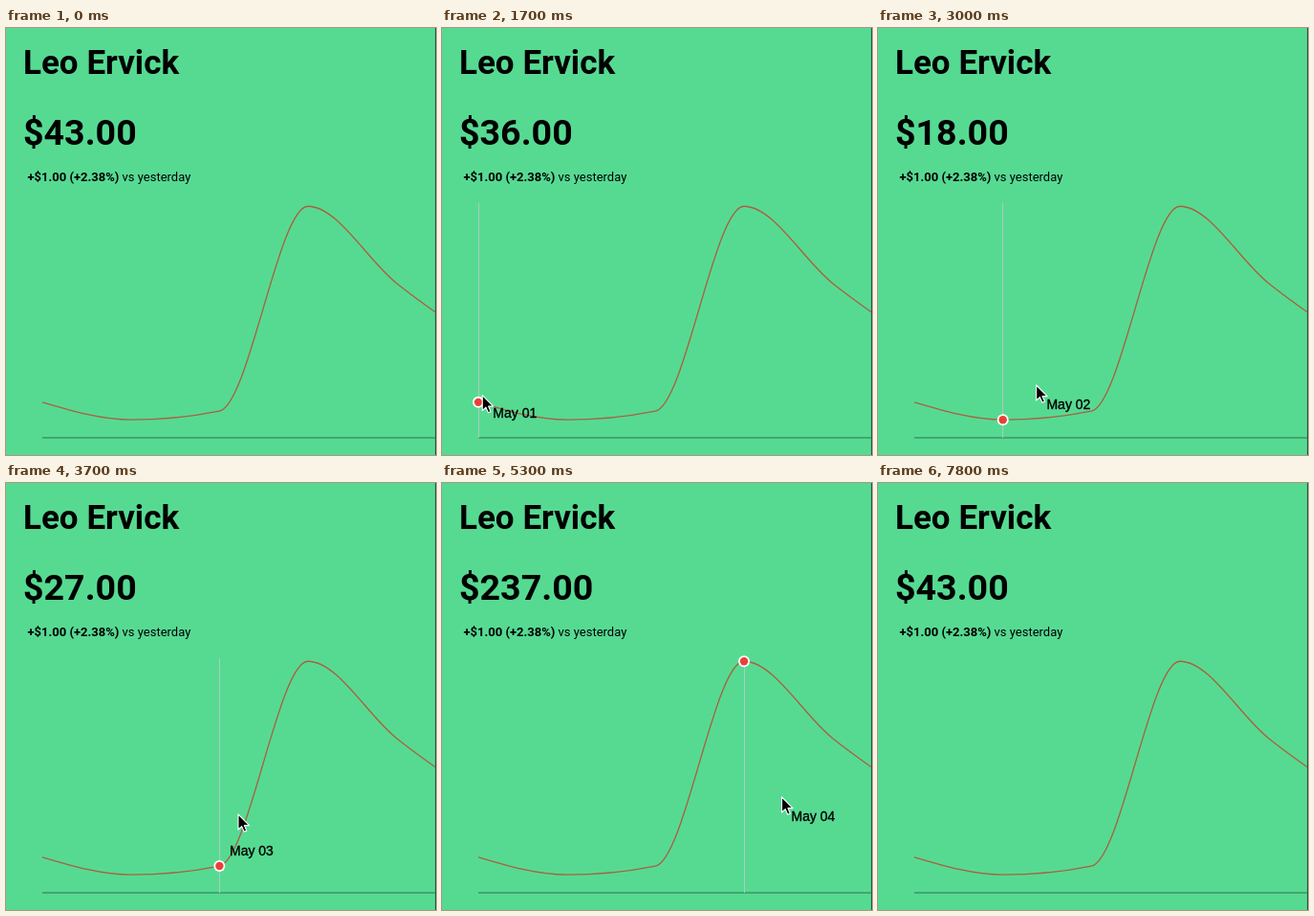
Animation, 450 px wide and 446 px high, one loop 8.7 s. Source, as an HTML page:

```html
<!DOCTYPE html>
<html lang="en">
<head>
<meta charset="utf-8">
<title>Price chart</title>
<style>
  html, body { margin: 0; width: 100%; height: 100%; overflow: hidden; background: #56da92; }
  svg { display: block; width: 450px; height: 446px; }
  text { font-family: Roboto, sans-serif; font-weight: 700; }
  #label { font: 14px "Liberation Sans", Arial, sans-serif; stroke: #000; stroke-width: .35; }
</style>
</head>
<body>
<svg viewBox="0 0 450 446">
  <rect width="450" height="446" fill="#56da92"/>
  <text x="18" y="48" font-size="35" font-weight="600">Leo Ervick</text>
  <text id="value" x="18" y="122" font-size="37.6"></text>
  <text x="22.5" y="160" font-size="13">+$1.00 (+2.38%)<tspan x="121.5" font-weight="400">vs yesterday</tspan></text>
  <path d="M38 428H450" stroke="#2f7553" stroke-width="1.2"/>
  <path id="curve" fill="none" stroke="#a9603f" stroke-width="1.3"/>
  <rect x="449" width="1" height="446" fill="#2f5a46"/>
  <g id="hover">
    <path id="rule" d="M0 183V428" stroke="#aacdba"/>
    <g id="dot">
      <circle r="6" fill="#fff"/>
      <circle r="4.2" fill="#e8403a"/>
    </g>
    <text id="label"></text>
  </g>
  <path id="cursor" d="M0 0V16L3.7 12.6L6.2 18.3L8.8 17.2L6.4 11.6H11.5Z" stroke="#fff" stroke-width="1.1" stroke-linejoin="round"/>
</svg>
<script>
const LOOP = 8700, STEP = 100, LABEL_LAG = 100;
const LEFT = 38, GAP = 92.7, BASE = 427.5, SCALE = 1.018;
const TODAY = 43;
const prices = [36, 18, 27, 237, 158, 93];

// key stops of the pointer tip: time, x, y
const stops = [
  [1000, -13, 382], [1900, 58, 384], [2200, 123, 380], [2700, 141, 377],
  [3600, 215, 365], [3700, 243, 346], [4400, 271, 339], [4600, 292, 335],
  [5800, 401, 323], [6200, 401, 323], [6700, 470, 320]
];

const $ = id => document.getElementById(id);
const px = i => LEFT + GAP * i;
const py = i => BASE - SCALE * prices[i];
const clamp = (v, lo, hi) => Math.max(lo, Math.min(hi, v));
const place = (el, x, y) => el.setAttribute("transform", `translate(${x} ${y})`);

// rise of the chord after point i, per gap
const chord = i => py(i + 1) - py(i);

// monotone cubic tangent, per gap
function tangent(i) {
  const last = prices.length - 1;
  if (i === 0) return (3 * chord(0) - tangent(1)) / 2;
  if (i === last) return (3 * chord(last - 1) - tangent(last - 1)) / 2;
  const a = chord(i - 1), b = chord(i);
  return (Math.sign(a) + Math.sign(b)) * Math.min(Math.abs(a), Math.abs(b), Math.abs(a + b) / 4);
}

function curvePath() {
  let d = `M${px(0)} ${py(0)}`;
  for (let i = 1; i < prices.length; i++) {
    const y0 = py(i - 1) + tangent(i - 1) / 3, y1 = py(i) - tangent(i) / 3;
    d += `C${px(i - 2 / 3)} ${y0} ${px(i - 1 / 3)} ${y1} ${px(i)} ${py(i)}`;
  }
  return d;
}

function pointerAt(t) {
  const next = stops.findIndex(s => s[0] > t);
  const i = next < 0 ? stops.length - 1 : Math.max(1, next);
  const [t0, x0, y0] = stops[i - 1], [t1, x1, y1] = stops[i];
  const u = clamp((t - t0) / (t1 - t0), 0, 1);
  return [x0 + (x1 - x0) * u, y0 + (y1 - y0) * u];
}

function render(t) {
  const [x, y] = pointerAt(t);
  const over = x > 20 && x < 435;
  const i = clamp(Math.round((x - LEFT) / GAP), 0, 4);
  const [lx, ly] = pointerAt(t - LABEL_LAG);

  place($("cursor"), x, y);
  place($("rule"), Math.floor(px(i)) + .5, 0);
  place($("dot"), px(i), py(i));
  place($("label"), lx + 19, ly + 24);
  $("label").textContent = "May 0" + (i + 1);
  $("hover").style.display = over ? "" : "none";
  $("value").textContent = "$" + (over ? prices[i] : TODAY).toFixed(2);
}

function tick() {
  const t = performance.now() % LOOP;
  render(Math.floor(t / STEP) * STEP);
  requestAnimationFrame(tick);
}

$("curve").setAttribute("d", curvePath());
tick();
</script>
</body>
</html>
```
